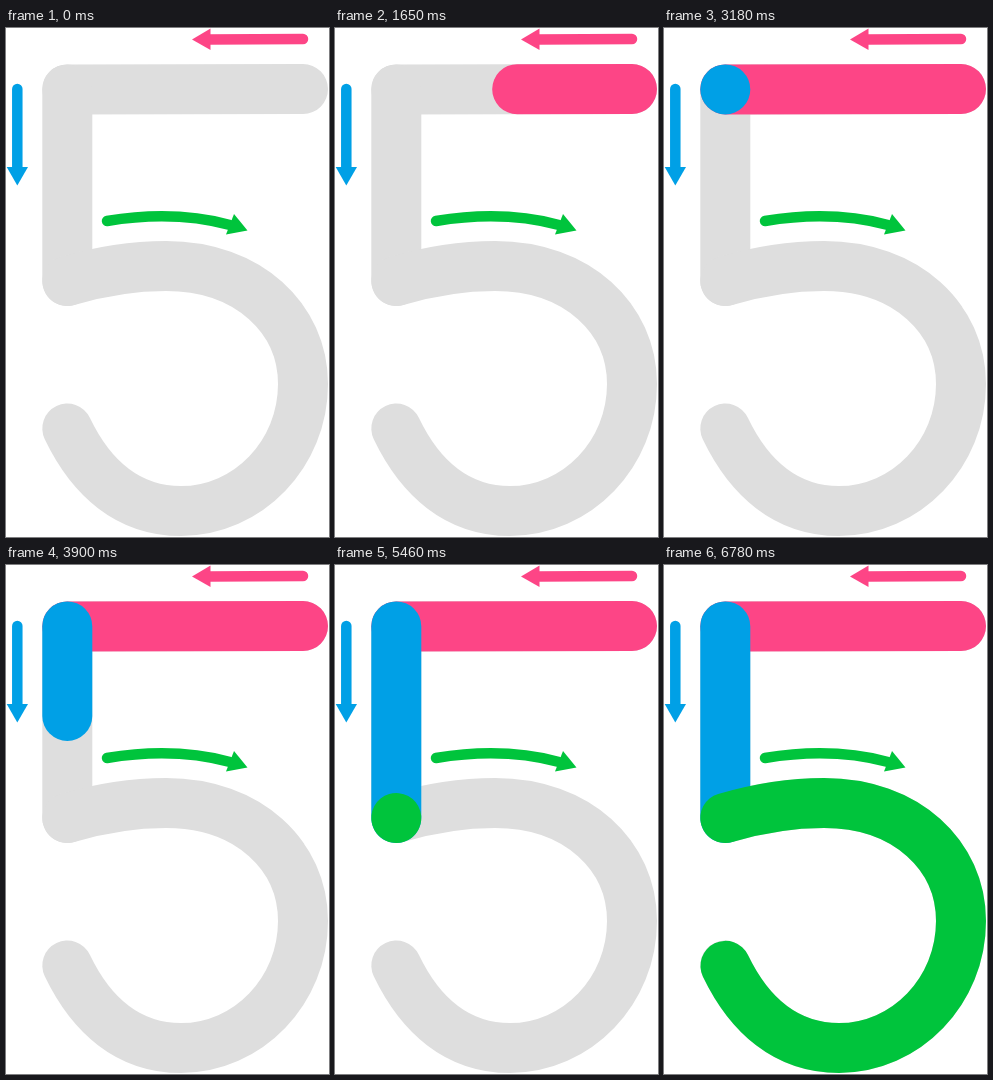
An HTML page that plays this animation: 323 by 509 pixels, repeating every 8000 ms.

```html
<!DOCTYPE html>
<html lang="en">
<head>
<meta charset="utf-8">
<title>Writing the digit 5</title>
<style>
  html, body { margin: 0; width: 100%; height: 100%; overflow: hidden; background: #fff; }
  svg { display: block; width: 323px; height: 509px; }
  .digit { fill: none; stroke-width: 50; stroke-linecap: round; }
  .arrow { fill: none; stroke-width: 10.5; stroke-linecap: round; }
</style>
</head>
<body>
<svg viewBox="0 0 323 509"></svg>
<script>
const LOOP = 8000, DURATION = 1350;
const svg = document.querySelector("svg");

const strokes = [
  { color: "#fd4586", show: 930, start: 930,
    d: "M297 61L61.3 61.4",
    shaft: "M297 11L203 11.5", head: "M186 11.5L204.5 .5V22Z" },
  { color: "#00a0e6", show: 3180, start: 3195,
    d: "M61.3 61.4V253",
    shaft: "M11.3 61V141", head: "M11.3 157.5L.7 139H22Z" },
  { color: "#00c43c", show: 5460, start: 5460,
    d: "M61.3 253C95 243 128 238 160 238C243 238 297 291 297 356C297 426 242 483 175 483C122 483 85 450 61.3 400.5",
    shaft: "M101 193Q168 182 224 197", head: "M241.5 202.5L228 186L220 206.5Z" },
];

function addPath(d, attrs) {
  const path = document.createElementNS("http://www.w3.org/2000/svg", "path");
  path.setAttribute("d", d);
  for (const key in attrs) path.setAttribute(key, attrs[key]);
  return svg.appendChild(path);
}

// Cubic Bézier easing (.5, 0, .61, 1), solved by bisection.
function ease(x) {
  if (x <= 0) return 0;
  if (x >= 1) return 1;
  let lo = 0, hi = 1, s;
  for (let i = 0; i < 24; i++) {
    s = (lo + hi) / 2;
    const r = 1 - s;
    if (3 * r * r * s * .5 + 3 * r * s * s * .61 + s ** 3 < x) lo = s;
    else hi = s;
  }
  return s * s * (3 - 2 * s);
}

for (const { d } of strokes) addPath(d, { class: "digit", stroke: "#dedede" });
for (const s of strokes) {
  s.path = addPath(s.d, { class: "digit", stroke: s.color });
  s.length = s.path.getTotalLength();
}
for (const { color, shaft, head } of strokes) {
  addPath(shaft, { class: "arrow", stroke: color });
  addPath(head, { fill: color });
}

function draw() {
  const t = performance.now() % LOOP;
  for (const { path, length, show, start } of strokes) {
    const drawn = Math.max(.01, length * ease((t - start) / DURATION));
    path.style.visibility = t < show ? "hidden" : "visible";
    path.style.strokeDasharray = `${drawn} 2000`;
  }
  requestAnimationFrame(draw);
}
draw();
</script>
</body>
</html>
```
